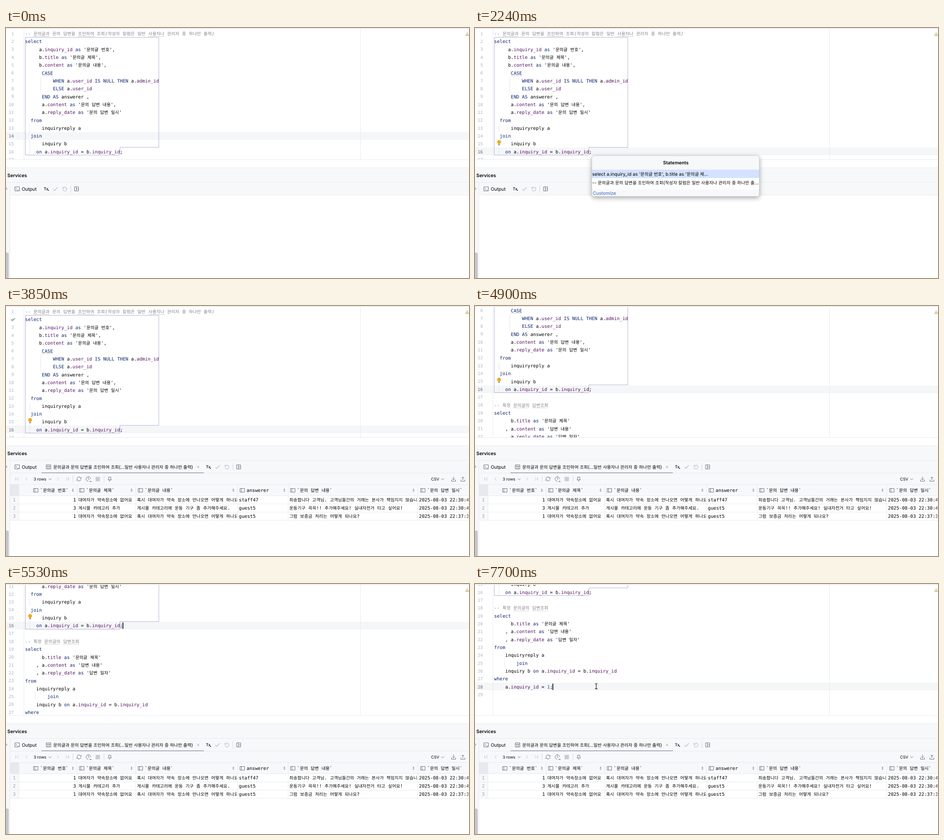
Recreate the animation shown at these times as an HTML page with a canvas. Size 1018 px wide and 550 px high, loop 8000 ms.

```html
<!DOCTYPE html>
<html lang="ko">
<head>
<meta charset="utf-8">
<title>SQL console</title>
<style>
html, body { margin: 0; width: 100%; height: 100%; overflow: hidden; background: #fff; }
canvas { display: block; }
</style>
</head>
<body>
<canvas id="stage" width="1018" height="550"></canvas>
<script>
const ctx = document.getElementById('stage').getContext('2d');
const LOOP = 8000, STEP = 70;
const ROW = 17.33, LEFT = 42, CHAR = 6.14;
const MONO = '"DejaVu Sans Mono", monospace', UI = 'Inter, sans-serif';
const HANGUL = '"Noto Sans CJK KR", "Noto Sans CJK JP", sans-serif';
const PANEL = '#f7f8fa', BORDER = '#e9eaee', ICON = '#6c707e', FAINT = '#b9bdc9', INK = '#000';

const CODE = `-- 문의글과 문의 답변을 조인하여 조회(작성자 칼럼은 일반 사용자나 관리자 중 하나만 출력)
select
     a.inquiry_id as '문의글 번호',
     b.title as '문의글 제목',
     b.content as '문의글 내용',
      CASE
          WHEN a.user_id IS NULL THEN a.admin_id
          ELSE a.user_id
      END AS answerer ,
      a.content as '문의 답변 내용',
      a.reply_date as '문의 답변 일시'
  from
      inquiryreply a
  join
      inquiry b
    on a.inquiry_id = b.inquiry_id;

-- 특정 문의글의 답변조회
select
      b.title as '문의글 제목'
    , a.content as '답변 내용'
    , a.reply_date as '답변 일자'
from
    inquiryreply a
        join
    inquiry b on a.inquiry_id = b.inquiry_id
where
    a.inquiry_id = 1;
`.split('\n');
const TOKEN = /--.*|'[^']*'|\.\w+|\w+|\s+|[^\w\s]/g;
const KEYWORD = /^(select|as|case|when|is|null|then|else|end|from|join|on|where)$/i;

const COLUMNS = [
  { x: 28, icon: 60, name: '`문의글 번호`', sort: 147 },
  { x: 156, icon: 161, name: '`문의글 제목`', sort: 276 },
  { x: 285, icon: 290, name: '`문의글 내용`', sort: 500 },
  { x: 509, icon: 514, name: 'answerer', sort: 612 },
  { x: 620, icon: 625, name: '`문의 답변 내용`', sort: 896 },
  { x: 905, icon: 911, name: '`문의 답변 일시`' },
];
const NO_SHOW = ['대여자가 약속장소에 없어요', '혹시 대여자가 약속 장소에 안나오면 어떻게 하나요?'];
const ROWS = [
  ['1', ...NO_SHOW, 'staff47', '죄송합니다 고객님. 고객님들간의 거래는 본사가 책임지지 않습니다.', '2025-08-03 22:30:45'],
  ['3', '게시물 카테고리 추가', '게시물 카테고리에 운동 기구 좀 추가해주세요.', 'guest5', '운동기구 꼭꼭!! 추가해주세요! 실내자전거 타고 싶어요!', '2025-08-03 22:30:45'],
  ['1', ...NO_SHOW, 'guest5', '그럼 보증금 처리는 어떻게 되나요?', '2025-08-03 22:37:31'],
];

const within = (t, from, to) => t >= from && t < to;
const progress = (t, from, to) => Math.min(1, Math.max(0, (t - from) / (to - from)));
const easeOut = (p, power) => 1 - (1 - p) ** power;

function rect(x, y, w, h, color) {
  ctx.fillStyle = color;
  ctx.fillRect(x, y, w, h);
}

function stroke(d, color = ICON, width = 1) {
  ctx.strokeStyle = color;
  ctx.lineWidth = width;
  ctx.stroke(new Path2D(d));
}

function shifted(x, y, draw) {
  ctx.save();
  ctx.translate(x, y);
  draw();
  ctx.restore();
}

function clipped(x, y, w, h, draw) {
  ctx.save();
  ctx.beginPath();
  ctx.rect(x, y, w, h);
  ctx.clip();
  draw();
  ctx.restore();
}

// Draws Latin and Hangul runs in their own fonts, centred on y; returns the end x.
function text(s, x, y, { color = INK, family = MONO, size = 10.2, style = '' } = {}) {
  ctx.fillStyle = color;
  for (const run of s.match(/[가-힣]+|[^가-힣]+/g) || []) {
    ctx.font = /[가-힣]/.test(run)
      ? `${style.replace('italic', '')} ${size * 0.943}px ${HANGUL}`
      : `${style} ${size}px ${family}`;
    ctx.fillText(run, x, y + size * 0.36);
    x += ctx.measureText(run).width;
  }
  return x;
}

function textRight(s, right, y, options) {
  text(s, right - s.length * CHAR, y, options);
}

function tokenStyle(token) {
  if (token.startsWith('--')) return { color: '#858585', style: 'italic' };
  if (KEYWORD.test(token)) return { color: '#0b2470' };
  if (/^\d+$/.test(token)) return { color: '#1750eb' };
  return {};
}

function codeLine(line, y) {
  let x = LEFT;
  for (const token of line.match(TOKEN) || []) {
    if (/^\.\w/.test(token)) {
      x = text('.', x, y);
      x = text(token.slice(1), x, y, { color: '#561062' });
    } else {
      x = text(token, x, y, tokenStyle(token));
    }
  }
}

function underline(x1, x2, y) {
  ctx.setLineDash([1.5, 1]);
  stroke(`M${x1} ${y}H${x2}`, '#b4b4b4');
  ctx.setLineDash([]);
}

function bulb(x, y) {
  ctx.fillStyle = '#f5a81c';
  ctx.beginPath();
  ctx.arc(x, y - 1.5, 4.2, 0, 7);
  ctx.fill();
  rect(x - 2, y + 1, 4, 2, '#f5a81c');
  rect(x - 2, y + 3.6, 4, 1.6, '#6c707e');
}

function ibeam(x, y) {
  const d = `M${x - 3} ${y - 6}q3 0 3 2v8q0 2 -3 2M${x + 3} ${y - 6}q-3 0 -3 2v8q0 2 3 2`;
  stroke(d, '#fff', 3);
  stroke(d, '#111', 1.2);
}

function editor(t) {
  const scroll = 180.5 * easeOut(progress(t, 4620, 5530), 1.845) + 73.5 * easeOut(progress(t, 5950, 6510), 2.8);
  const active = t < 840 ? 14 : t < 7630 ? 16 : 28;
  const lineY = n => 12.2 + (n - 1) * ROW - scroll;

  rect(0, 0, 1018, 1.5, '#e6e7ea');
  clipped(0, 2, 1018, 287, () => {
    rect(0, Math.round(lineY(active) - ROW / 2), 1018, 17, '#f5f6f8');
    stroke('M39.5 0V289M779.5 0V289', BORDER);

    const guide = (x, first, last) => stroke(`M${x} ${lineY(first) - 8.7}V${lineY(last) + 8.7}`, '#e3e5ea');
    guide(76.5, 7, 8);
    guide(52.5, 13, 13);
    guide(52.5, 15, 16);
    guide(64.5, 25, 25);

    const top = Math.floor(lineY(2) - 8.7) + 0.5, notch = top + 242, bottom = top + 259;
    stroke(`M42.5 ${top}H336V${notch}H250.5V${bottom}H42.5Z`, '#b6b0d8');

    CODE.forEach((line, i) => {
      const n = i + 1, y = lineY(n);
      if (y < -9 || y > 298) return;
      codeLine(line, y);
      if (n === 2 && t >= 2800) stroke(`M11 ${y}l3 3l6 -6M14 ${y - 1}l2 2`, '#7c808c', 1.3);
      else textRight(String(n), 18, y, { size: 9.6, color: n === active ? '#656a78' : '#b0b4c0' });
    });
    underline(60, 95, lineY(1) + 6.3);
    underline(158, 194, lineY(1) + 6.3);
    underline(313, 349, lineY(1) + 6.3);
    underline(79, 103, lineY(6) + 6.3);
    underline(84, 119, lineY(18) + 6.3);
    underline(126, 161, lineY(18) + 6.3);

    if (within(t, 1960, 2800) || within(t, 3640, 6020)) bulb(53, lineY(15) - 2.5);

    const caretOn = within(t, 840, 1890) || within(t, 2870, 3850) || within(t, 4410, 4900)
      || within(t, 5460, 6020) || within(t, 6510, 7070) || t >= 7630;
    if (caretOn) rect(LEFT + CODE[active - 1].length * CHAR - 0.6, lineY(active) - 7, 1.7, 14, '#000');

    const move = (from, to, x1, y1, x2, y2) => {
      const p = easeOut(progress(t, from, to), 2);
      ibeam(x1 + (x2 - x1) * p, y1 + (y2 - y1) * p);
    };
    if (within(t, 70, 910)) move(70, 840, 518, 470, 270, 272);
    if (t >= 7280) move(7210, 7630, 340, 250, 266.5, 225);

    ctx.fillStyle = '#d5c9a2';
    ctx.fill(new Path2D('M1014 8.5L1018.5 17.5H1009.5Z'));
    rect(1013.6, 11.5, 1, 3, '#fff');
  });
  stroke('M0 289.5H1018', BORDER);
}

function tableIcon(x, y) {
  stroke(`M${x + .5} ${y - 4.5}h10v9h-10zM${x + .5} ${y - 1.5}h10M${x + 4} ${y - 1.5}v6M${x + 7.5} ${y - 1.5}v6`);
}

function services(hasResult) {
  const ui = { family: UI };
  rect(0, 307, 1018, 60, PANEL);
  rect(0, 367, 8, 183, PANEL);
  stroke('M0 307.5H1018M0 339.5H1018M8.5 340V550M8 367.5H1018', BORDER);
  text('Services', 3, 324, { family: UI, style: '600' });
  stroke('M0 351l2.5 2.5l-2.5 2.5');
  ctx.fillStyle = '#c6c7ca';
  ctx.beginPath();
  ctx.roundRect(-3, 494, 9, 60, 3);
  ctx.fill();

  stroke('M19.5 349.5h10v9h-10zM21.5 352l2 2l-2 2M25 356.5h3');
  text('Output', 34.7, 354, ui);
  if (hasResult) {
    tableIcon(88, 354);
    text('문의글과 문의 답변을 조인하여 조회(...일반 사용자나 관리자 중 하나만 출력)', 104, 354, ui);
    stroke('M420 351.5l5 5M425 351.5l-5 5', '#9a9daa');
  }
  shifted(hasResult ? 356.5 : 0, 0, () => {
    text('Tx', 83, 354, { family: UI, size: 8.8, style: '500' });
    rect(92.5, 356, 1.5, 2, INK);
    stroke('M104 354.5l3 3l6.5 -7', FAINT, 1.2);
    stroke('M125 349.5v3.5h3.5M125.5 352.5a4.3 4.3 0 1 1 -.3 3', FAINT, 1.1);
    stroke('M142.5 346V362', '#d9dbe1');
    stroke('M150.5 349.5h9v9h-9zM154.5 349.5v9M154.5 354h5');
  });
}

function resultToolbar() {
  const small = { family: UI, size: 8.8 };
  rect(9, 368, 1009, 25, PANEL);
  rect(78, 366, 357, 2, '#a8adbd');
  stroke('M21.5 377v7M28 377l-3.5 3.5l3.5 3.5M47 377l-3.5 3.5l3.5 3.5M112.5 377l3.5 3.5l-3.5 3.5M131.5 377l3.5 3.5l-3.5 3.5M137.5 377v7', FAINT);
  text('3 rows', 60.7, 380.5, small);
  stroke('M94 379.5l3 3l3 -3M957 379.5l3 3l3 -3');
  stroke('M147.5 373V388M215.5 373V388', '#d9dbe1');
  stroke('M156 380a4.6 4.6 0 0 1 8.5 -1.8M165 381a4.6 4.6 0 0 1 -8.5 1.8M166.5 377l-1.7 2.5l-2.5 -1.5M154.5 384l1.7 -2.5l2.5 1.5');
  stroke('M186 380.5a5 5 0 1 0 -5 5M181 377v3.5l2.5 1.5M184 386h4l-2 0z');
  rect(197, 376, 9.5, 9.5, '#c9ccd6');
  stroke('M225.5 376.5h5v4l1.5 2h-8l1.5 -2zM228 382.5v4');
  text('CSV', 934.5, 380.5, small);
  stroke('M984 375.5v7M981 379.5l3 3l3 -3M979.5 382v3.5h9v-3.5M1004.5 383v-7M1001.5 379l3 -3l3 3M1000 382v3.5h9v-3.5');
}

function resultGrid() {
  rect(9, 393, 1009, 24, PANEL);
  rect(9, 393, 19, 24, '#e8e9ee');
  rect(9, 417, 19, 54, PANEL);
  stroke('M9 392.5H1018M9 417.5H1018M9 435.5H1018M9 453.5H1018M9 471.5H1018', BORDER);

  COLUMNS.forEach((column, i) => {
    const right = COLUMNS[i + 1]?.x ?? 1018;
    stroke(`M${column.x + .5} 393V471`, BORDER);
    stroke(`M${column.icon + .5} 401.5h10v8h-10zM${column.icon + 3.5} 401.5v8`);
    text(column.name, column.icon + 15, 405.5);
    if (column.sort) {
      ctx.fillStyle = ICON;
      ctx.fill(new Path2D(`M${column.sort - 2} 404.3h4l-2 -2.3zM${column.sort - 2} 406.3h4l-2 2.3z`));
    }
    clipped(column.x, 417, right - column.x - 1.5, 54, () => ROWS.forEach((row, r) => {
      const y = 426 + r * 18;
      if (i === 0) textRight(row[0], 154, y);
      else text(row[i], column.x + 3, y);
    }));
  });
  ROWS.forEach((_, r) => text(String(r + 1), 15, 426 + r * 18, { color: '#9da1ae' }));
}

function popup() {
  const ui = { family: UI };
  const box = new Path2D();
  box.roundRect(257, 281, 368, 89.5, 5);
  ctx.save();
  ctx.shadowColor = 'rgba(0,0,0,.38)';
  ctx.shadowBlur = 11;
  ctx.shadowOffsetY = 3;
  ctx.fillStyle = PANEL;
  ctx.fill(box);
  ctx.restore();
  ctx.save();
  ctx.clip(box);
  rect(257, 311, 368, 44, '#fff');
  rect(257, 311.5, 368, 18.5, '#d4e2ff');
  text('Statements', 413.5, 296.5, { family: UI, style: '600' });
  text("select a.inquiry_id as '문의글 번호', b.title as '문의글 제...", 257.7, 321, ui);
  text('-- 문의글과 문의 답변을 조인하여 조회(작성자 칼럼은 일반 사용자나 관리자 중 하나만 출...', 257.7, 340, ui);
  text('Customize', 259, 363, { family: UI, color: '#315fbd' });
  ctx.restore();
  ctx.strokeStyle = '#c4c6cd';
  ctx.lineWidth = 0.7;
  ctx.stroke(box);
}

function draw(t) {
  const hasResult = t >= 2800;
  rect(0, 0, 1018, 550, '#fff');
  editor(t);
  services(hasResult);
  if (hasResult) {
    resultToolbar();
    resultGrid();
  }
  if (within(t, 2240, 2730)) popup();
}

ctx.textRendering = 'geometricPrecision';
ctx.lineJoin = 'round';
const start = performance.now();
function tick() {
  const t = (performance.now() - start) % LOOP;
  draw(Math.floor(t / STEP) * STEP);
  requestAnimationFrame(tick);
}
tick();
</script>
</body>
</html>
```
